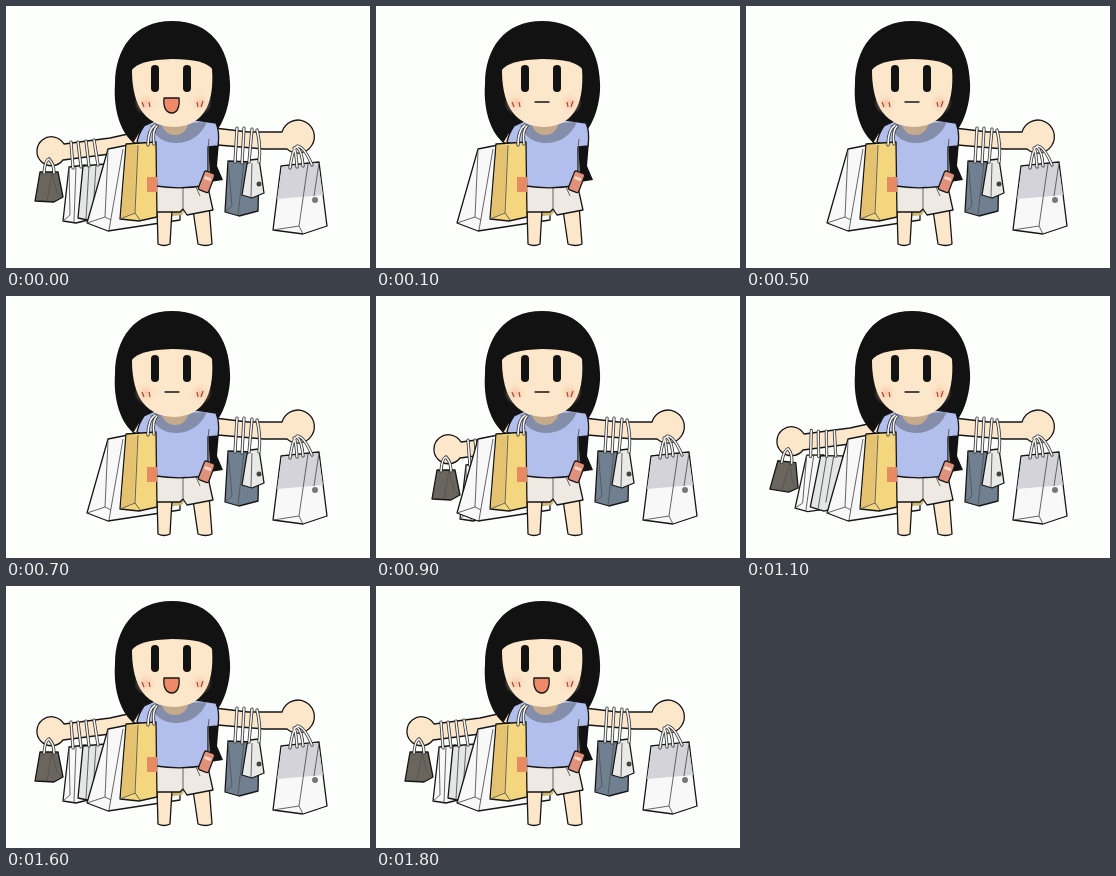
Animation of 364 by 262 pixels, one loop 2 s. Source, as an HTML page:

```html
<!DOCTYPE html>
<html lang="en">
<head>
<meta charset="utf-8">
<title>Shopping girl</title>
<style>
  html, body { margin: 0; width: 100%; height: 100%; overflow: hidden; background: #fdfffd; }
  svg { display: block; width: 364px; height: 262px; }
  .ink { stroke: #161616; stroke-width: 1.3; stroke-linejoin: round; stroke-linecap: round; }
  .fold { fill: none; stroke: #555; stroke-width: .9; }
  .skin { fill: #fce7cb; }
  .hair { fill: #121212; }
  .white { fill: #f8f8f8; }
  .cord { fill: none; stroke: #333; stroke-width: 3.2; stroke-linecap: round; }
  .cord + .cord { stroke: #f4f4f4; stroke-width: 1.6; }
</style>
</head>
<body>
<svg viewBox="0 0 364 262">
  <defs>
    <radialGradient id="blush">
      <stop offset="0" stop-color="#f9b596" stop-opacity=".7"/>
      <stop offset="1" stop-color="#fce7cb" stop-opacity="0"/>
    </radialGradient>
  </defs>

  <g id="leftArm">
    <path class="skin ink" d="M140 124L104 132L58 138A14.5 14.5 0 1 0 57 154L104 148L140 143Z"/>
    <g id="leftBags">
      <path class="white ink" d="M63 161L80 159L82 214L70 217L57 215Z"/>
      <path class="fold" d="M70 161L68 216M63 161L64 209L57 215"/>
      <path class="ink" fill="#e3e6e5" d="M77 160L99 158L104 208L86 215L72 212Z"/>
      <path class="fold" d="M83 160L80 213M90 159L87 206"/>
      <g data-cord="M65 136L67 162M72 136L75 161M80 135L83 160M88 134L92 159"/>
    </g>
    <g id="leftHandBag">
      <path class="ink" fill="#6a655d" d="M34 166L52 166L57 191L48 196L29 195Z"/>
      <path class="fold" d="M46 167L41 195M46 167L51 186L56 191"/>
      <g data-cord="M38 167Q39 154 43 153M43 153Q48 158 48 167"/>
    </g>
  </g>

  <path class="white ink" d="M102 143L122 139L150 149L174 204V214L102 225L81 217Z"/>
  <path class="fold" d="M117 143L103 224M102 145L99 211L81 217M99 211L105 214"/>
  <path fill="#cdb673" d="M150 202L180 202L176 209L150 212Z"/>

  <g id="rightArm">
    <path class="skin ink" d="M200 121L242 126L276 126A16.5 16.5 0 1 1 281 143L258 143L200 138Z"/>
  </g>

  <path class="hair" d="M202 130L213 136L211 160L217 174L204 176Z"/>
  <path class="hair" d="M166 15C128 15 109 43 109 78C107 104 115 128 129 138L150 122H200L209 127C218 117 225 96 224 77C223 42 205 15 166 15Z"/>

  <path class="skin ink" d="M151 202L152 238Q158 241 164 238L166 204ZM187 204L192 238Q200 241 206 238L203 199Z"/>
  <path class="ink" fill="#eee9e3" d="M149 177L201 177L207 204L181 209L177 203L174 206L150 206Z"/>
  <path class="fold" d="M177 182V203M190 181L194 190"/>
  <path class="skin ink" d="M133 126L127 136L138 141Z"/>
  <path class="ink" fill="#b2bfed" d="M138 120Q133 127 131 136L148 143L150 180Q176 184 202 179V141L212 140Q214 126 210 117L190 114H151Z"/>
  <path fill="#848da9" d="M144 119Q151 137 171 137Q192 136 201 116Z"/>
  <path fill="#c5aa8c" d="M155 116Q158 129 169 129Q180 129 183 116Z"/>
  <path class="fold" d="M203 133L202 143"/>
  <g transform="rotate(21 201 176)">
    <rect class="ink" x="195" y="166" width="11" height="20" rx="2" fill="#e0917c"/>
    <path fill="#f8d5c4" d="M197 171h7v3h-7z"/>
  </g>

  <path class="skin" d="M126 64Q133 54 166 53Q199 53 206 63C208 91 202 120 168 121C134 120 126 92 126 64Z"/>
  <circle cx="140" cy="97" r="12" fill="url(#blush)"/>
  <circle cx="194" cy="97" r="12" fill="url(#blush)"/>
  <path d="M136 96l2 5M143 96l1 5M191 96l1 5M197 95l-2 6" stroke="#a84635" stroke-width="1.2" fill="none"/>
  <rect class="hair" x="145" y="59" width="8" height="27" rx="4"/>
  <rect class="hair" x="177" y="59" width="8" height="27" rx="4"/>
  <path id="closed" class="ink" fill="none" d="M159 96H173"/>
  <path id="open" class="ink" fill="#ef8a69" d="M158 92H173C174 101 171 107 166 107C160 107 157 101 158 92Z"/>

  <path class="ink" fill="#f4d67f" d="M120 138L150 136L151 211L133 215L114 213Z"/>
  <path fill="#e4c270" d="M121 139L131 140L128 206L115 212Z"/>
  <path class="fold" d="M132 139L129 207L114 213M129 207L134 214"/>
  <rect x="141" y="171" width="10" height="15" fill="#e88a60"/>
  <g data-cord="M142 139Q142 124 149 119M148 138Q146 125 151 120"/>

  <g id="rightHandParts">
    <g id="rightBags">
      <path class="ink" fill="#708090" d="M222 155L246 156L253 161L252 205L233 210L219 206Z"/>
      <path class="fold" d="M238 156L232 209M222 155L226 200L219 206"/>
      <path class="ink" fill="#e9eae8" d="M241 158L244 154L253 153L258 187L246 192L236 189Z"/>
      <path class="fold" d="M246 157L245 191"/>
      <circle cx="253" cy="178" r="2.5" fill="#444"/>
      <g data-cord="M231 122L229 156M238 122L236 157M246 123L243 156M251 124Q255 140 253 156"/>
    </g>
    <g id="rightHandBag">
      <path class="ink white" d="M275 160L313 156L321 220L297 228L267 224Z"/>
      <path fill="#d3d3d9" d="M276 161L312 157L317 189L271 193Z"/>
      <path class="fold" d="M302 158L293 220L297 228M293 220L267 224M313 157L308 190"/>
      <circle cx="309" cy="194" r="3" fill="#777"/>
      <g data-cord="M284 162Q287 141 291 141Q296 145 297 160M291 140Q298 140 306 159M288 142Q290 145 291 161"/>
    </g>
  </g>
</svg>
<script>
  const el = id => document.getElementById(id);

  // Each handle is a light cord over a dark outline.
  for (const g of document.querySelectorAll('[data-cord]')) {
    g.innerHTML = `<path class="cord" d="${g.dataset.cord}"/>`.repeat(2);
  }

  const show = (id, on) => el(id).setAttribute('visibility', on ? 'visible' : 'hidden');
  const set = (id, value) => el(id).setAttribute('transform', value);
  const swing = (id, angle, x, y) => set(id, `rotate(${angle} ${x} ${y})`);

  // An arm slides out half way, then its bags lag inward, swing outward and settle.
  const reach = (step, start) => step === 0 ? 2 : Math.max(0, Math.min(2, step - start));
  const sway = (step, start, inward, outward) =>
    step === start + 2 ? inward : step === start + 3 ? outward : 0;

  function draw(ms) {
    const step = Math.min(18, Math.floor(ms % 2000 / 100));
    const right = reach(step, 1), left = reach(step, 8);
    const rightSwing = sway(step, 1, 25, -14), leftSwing = sway(step, 8, -14, 6);
    const smile = step === 0 || step >= 15;

    for (const id of ['rightArm', 'rightHandParts']) {
      show(id, right > 0);
      set(id, `translate(${-27 * (2 - right)} ${8 * (2 - right)})`);
    }
    swing('rightBags', rightSwing, 238, 125);
    swing('rightHandBag', rightSwing, 291, 130);

    show('leftArm', left > 0);
    set('leftArm', `translate(${27 * (2 - left)} ${8 * (2 - left)})`);
    swing('leftBags', leftSwing, 80, 138);
    swing('leftHandBag', leftSwing, 45, 145);

    show('open', smile);
    show('closed', !smile);
  }

  const begin = performance.now();
  function tick() {
    draw(performance.now() - begin);
    requestAnimationFrame(tick);
  }
  tick();
</script>
</body>
</html>
```
